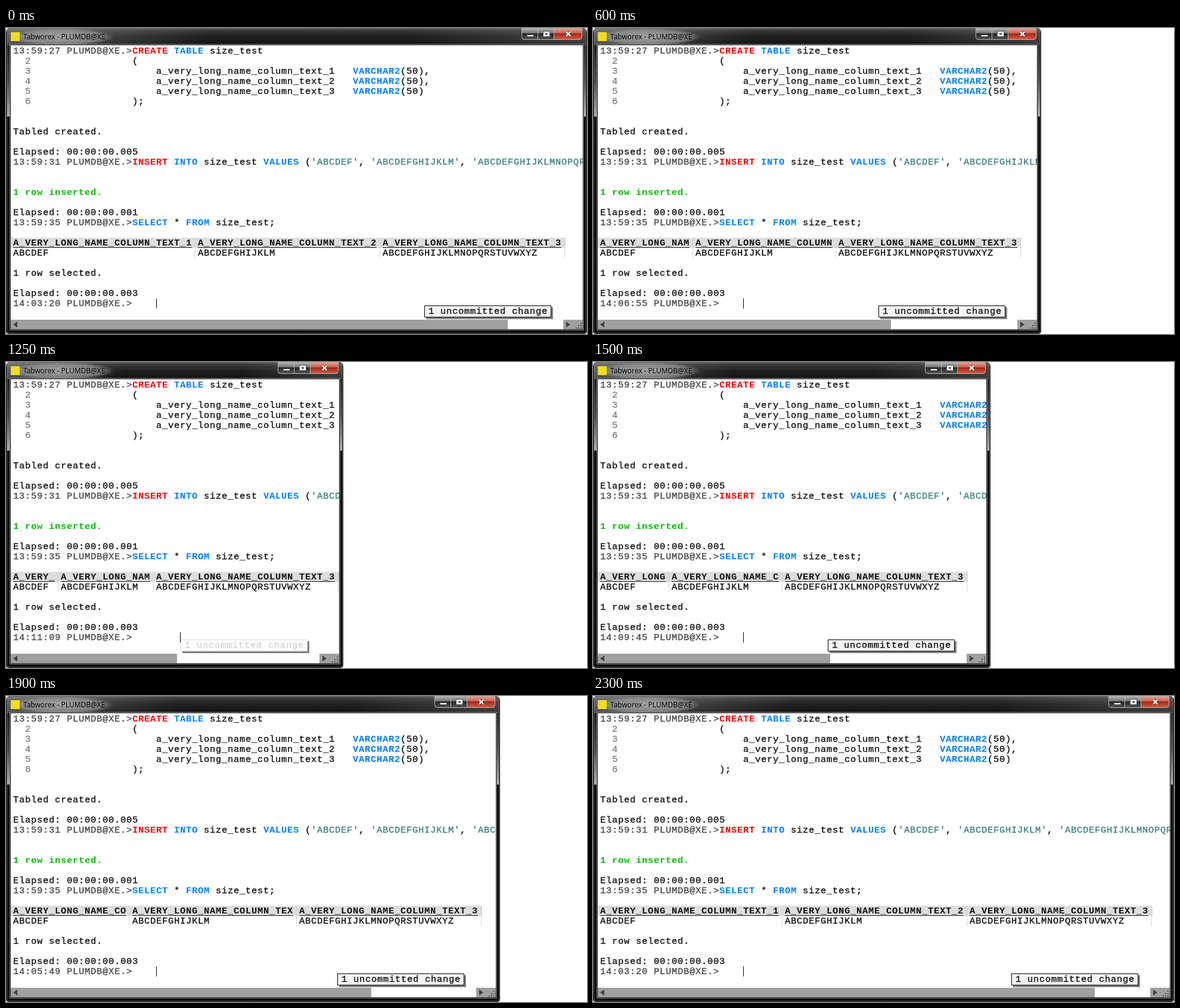
Recreate the animation shown at these times as an HTML page with a canvas. Size 975x515 px, loop 2.35 s.

```html
<!DOCTYPE html>
<html lang="en">
<head>
<meta charset="utf-8">
<title>Resizing result grid</title>
<style>
html, body { margin: 0; width: 100%; height: 100%; overflow: hidden; background: #fff; }
canvas { display: block; }
</style>
</head>
<body>
<canvas id="stage" width="975" height="515"></canvas>
<script>
const ctx = document.getElementById('stage').getContext('2d');
const STEP = 50, STEPS = 47, LAST = STEPS - 1;
const CELL = 10, LINE = 17, LEFT = 12, BASE = 43;
const MONO = '15.5px "Liberation Mono", monospace';
const BLUE = '#0080ff', RED = '#ff0000', GREEN = '#00c000', TEAL = '#408080';
const INK = '#101010', DIM = '#484848', GRAY = '#808080';

// [step, value]; the window shrinks for half the loop, then grows back
const WIDTH = [[0, 975], [2, 936], [4, 899], [11, 777], [12, 752], [13, 731], [17, 646], [21, 566], [23, 526]];
const CLOCK = [[0, 200], [4, 283], [12, 415], [17, 627], [21, 669], [23, 690]];
const TRACK = [[0, 133], [4, 180], [12, 252], [17, 273], [21, 279], [23, 281]];

const HOST = 'PLUMDB@XE';
const NAME = 'A_VERY_LONG_NAME_COLUMN_TEXT_';
const ALPHABET = 'ABCDEFGHIJKLMNOPQRSTUVWXYZ';
const DATA = [6, 13, 26].map(n => ALPHABET.slice(0, n));

function lookup(keys, k) {
  const i = Math.max(1, keys.findIndex(p => p[0] >= k));
  const [a, va] = keys[i - 1], [b, vb] = keys[i];
  return Math.round(va + (vb - va) * (k - a) / (b - a));
}

function box(x, y, w, h, fill) {
  ctx.fillStyle = fill;
  ctx.fillRect(x, y, w, h);
}

function frame(x, y, w, h, color) {
  ctx.strokeStyle = color;
  ctx.lineWidth = 1;
  ctx.strokeRect(x + .5, y + .5, w - 1, h - 1);
}

function shape(points, fill) {
  ctx.fillStyle = fill;
  ctx.beginPath();
  points.forEach(([x, y]) => ctx.lineTo(x, y));
  ctx.fill();
}

function fade(x0, y0, x1, y1, ...stops) {
  const g = ctx.createLinearGradient(x0, y0, x1, y1);
  stops.forEach(([at, color]) => g.addColorStop(at, color));
  return g;
}

function mono(x, y, text, color = INK, bold = false) {
  ctx.font = (bold ? 'bold ' : '') + MONO;
  ctx.letterSpacing = '0px';
  ctx.letterSpacing = CELL - ctx.measureText('M').width + 'px';
  ctx.fillStyle = ctx.strokeStyle = color;
  ctx.fillText(text, x, y);
  if (!bold) {
    // Medium weight
    ctx.lineWidth = .35;
    ctx.strokeText(text, x, y);
  }
  ctx.letterSpacing = '0px';
}

// Runs are [text, color, bold], laid one after another
function write(row, col, ...runs) {
  for (const [text, color, bold] of runs) {
    mono(LEFT + col * CELL, BASE + row * LINE, text, color, bold);
    col += text.length;
  }
}

const prompt = time => [`${time} ${HOST}.>`, DIM];
const key = (text, color = BLUE) => [text, color, true];

function button(x, w, fill, last) {
  ctx.beginPath();
  ctx.roundRect(x + .5, .5, w, 19, [0, 0, last === 1 ? 4 : 0, last === -1 ? 4 : 0]);
  ctx.fillStyle = fill;
  ctx.fill();
  ctx.strokeStyle = '#b4b4b4';
  ctx.lineWidth = 1;
  ctx.stroke();
}

function chrome(w) {
  ctx.beginPath();
  ctx.roundRect(0, 0, w, 515, [7, 7, 5, 5]);
  ctx.fillStyle = '#000';
  ctx.fill();
  ctx.save();
  ctx.clip();
  box(1, 1, w - 2, 28, fade(0, 1, 0, 29, [0, '#4a4a4a'], [.15, '#2c2c2c'], [.5, '#161616'], [1, '#080808']));
  box(1, 1, w - 2, 28, fade(0, 0, w, 0,
    [0, 'rgba(255,255,255,.3)'], [.35, 'rgba(255,255,255,.04)'], [.7, 'rgba(255,255,255,.04)'], [1, 'rgba(255,255,255,.2)']));

  const side = fade(0, 29, 0, 149, [0, '#1c1c1c'], [.5, '#484848'], [1, '#b0b0b0']);
  box(2, 29, 5, 120, side);
  box(w - 6, 29, 4, 120, side);

  // Soft glow behind the caption
  ctx.save();
  ctx.translate(92, 15);
  ctx.scale(1, .17);
  const glow = ctx.createRadialGradient(0, 0, 20, 0, 0, 90);
  glow.addColorStop(0, 'rgba(170,170,170,.85)');
  glow.addColorStop(.7, 'rgba(150,150,150,.7)');
  glow.addColorStop(1, 'rgba(130,130,130,0)');
  ctx.fillStyle = glow;
  ctx.fillRect(-92, -90, 184, 180);
  ctx.restore();
  ctx.restore();

  ctx.beginPath();
  ctx.roundRect(1.5, .5, w - 3, 513, [6, 6, 4, 4]);
  ctx.strokeStyle = '#6e6e6e';
  ctx.lineWidth = 1;
  ctx.stroke();

  box(8, 7, 15, 15, '#f2dc1c');
  ctx.font = '12px "Open Sans", "Noto Sans", sans-serif';
  ctx.fillStyle = '#000';
  ctx.fillText('Tabworex - ' + HOST, 29, 19);

  const glass = fade(0, 0, 0, 20, [0, '#b8b8b8'], [.45, '#707070'], [.46, '#262626'], [1, '#565656']);
  const red = fade(0, 0, 0, 20, [0, '#e4a397'], [.45, '#c9604e'], [.46, '#a72410'], [1, '#d2604a']);
  button(w - 110, 27, glass, -1);
  button(w - 83, 27, glass, 0);
  button(w - 56, 47, red, 1);
  box(w - 101, 11, 12, 4, '#fff');
  frame(w - 101, 11, 12, 4, '#555');
  box(w - 74, 5, 12, 10, '#fff');
  frame(w - 74, 5, 12, 10, '#555');
  box(w - 70, 9, 4, 2, '#333');
  for (const [width, color] of [[4.5, '#5a2018'], [2.5, '#fff']]) {
    ctx.strokeStyle = color;
    ctx.lineWidth = width;
    ctx.beginPath();
    ctx.moveTo(w - 35, 6.5); ctx.lineTo(w - 28, 13.5);
    ctx.moveTo(w - 28, 6.5); ctx.lineTo(w - 35, 13.5);
    ctx.stroke();
  }
  frame(6, 27, w - 11, 482, '#8c8c8c');
  frame(7, 28, w - 13, 480, '#1c1c1c');
}

// Narrow the emptiest columns first, down to a minimum total
function columns(w) {
  const total = Math.min(93, Math.max(55, Math.floor((w - 38) / CELL)));
  const cut = 93 - total;
  const second = Math.max(0, Math.floor((cut - 7) / 2));
  return [30 - (cut - second), 30 - second, 30];
}

function grid(w) {
  const sizes = columns(w);
  const total = sizes.reduce((sum, n) => sum + n + 1, 0);
  box(8, 353, total * CELL + 1, 17, '#dedede');
  let col = 0;
  sizes.forEach((n, i) => {
    write(19, col, key((NAME + (i + 1)).slice(0, n), INK));
    box(LEFT + col * CELL, 369, n * CELL, 1, INK);
    write(20, col, [DATA[i]]);
    col += n + 1;
    box(7 + col * CELL, 353, 1, 34, '#d4d4d4');
  });
}

function session(w, k) {
  write(0, 0, prompt('13:59:27'), key('CREATE', RED), key(' TABLE'), [' size_test']);
  for (let n = 2; n <= 6; n++) write(n - 1, 2, [String(n), GRAY]);
  write(1, 20, ['(']);
  for (let n = 1; n <= 3; n++) {
    write(n + 1, 24, [NAME.toLowerCase() + n + '   '], key('VARCHAR2'), [n < 3 ? '(50),' : '(50)']);
  }
  write(5, 20, [');']);
  write(8, 0, ['Tabled created.']);
  write(10, 0, ['Elapsed: 00:00:00.005']);

  const values = DATA.flatMap((s, i) => [[`'${s}'`, TEAL], [i < 2 ? ', ' : ');']]);
  write(11, 0, prompt('13:59:31'), key('INSERT', RED), key(' INTO'), [' size_test '], key('VALUES'), [' ('], ...values);
  write(14, 0, key('1 row inserted.', GREEN));
  write(16, 0, ['Elapsed: 00:00:00.001']);
  write(17, 0, prompt('13:59:35'), key('SELECT'), [' * '], key('FROM'), [' size_test;']);
  grid(w);
  write(22, 0, ['1 row selected.']);
  write(24, 0, ['Elapsed: 00:00:00.003']);

  const s = lookup(CLOCK, k), two = n => String(n).padStart(2, '0');
  write(25, 0, prompt(`14:${two(Math.floor(s / 60))}:${two(s % 60)}`));
  box(k < 21 ? 252 : 292, 455, 1, 17, '#000');
}

function badge(w, pale) {
  const x = w - 273;
  box(x + 3, 470, 213, 20, '#808080');
  box(x, 467, 213, 20, pale ? '#fdfdfd' : '#f3f3f3');
  frame(x, 467, 213, 20, pale ? '#dcdcdc' : '#000');
  mono(x + 7, 481, '1 uncommitted change', pale ? '#d6d6d6' : INK);
}

function scrollbar(w, gap) {
  box(8, 491, w - 15, 16, '#a0a0a0');
  box(w - gap, 491, gap - 40, 16, '#fff');
  shape([[12, 499], [19, 494], [19, 504]], '#404040');
  shape([[w - 28, 499], [w - 35, 494], [w - 35, 504]], '#404040');
  for (let r = 0; r < 3; r++) {
    for (let c = 0; c <= r; c++) {
      box(w - 11 - c * 4, 496 + r * 4, 2, 2, '#505050');
    }
  }
}

function draw(k) {
  const w = lookup(WIDTH, k);
  box(0, 0, 975, 515, '#fff');
  chrome(w);
  ctx.save();
  ctx.beginPath();
  ctx.rect(8, 29, w - 15, 478);
  ctx.clip();
  box(8, 29, w - 15, 478, '#fff');
  session(w, k);
  badge(w, k === 21);
  scrollbar(w, lookup(TRACK, k));
  ctx.restore();
}

const start = performance.now();
let shown = -1;
function tick() {
  const step = Math.floor((performance.now() - start) / STEP) % STEPS;
  if (step !== shown) draw(Math.min(step, LAST - step));
  shown = step;
  requestAnimationFrame(tick);
}
tick();
</script>
</body>
</html>
```
